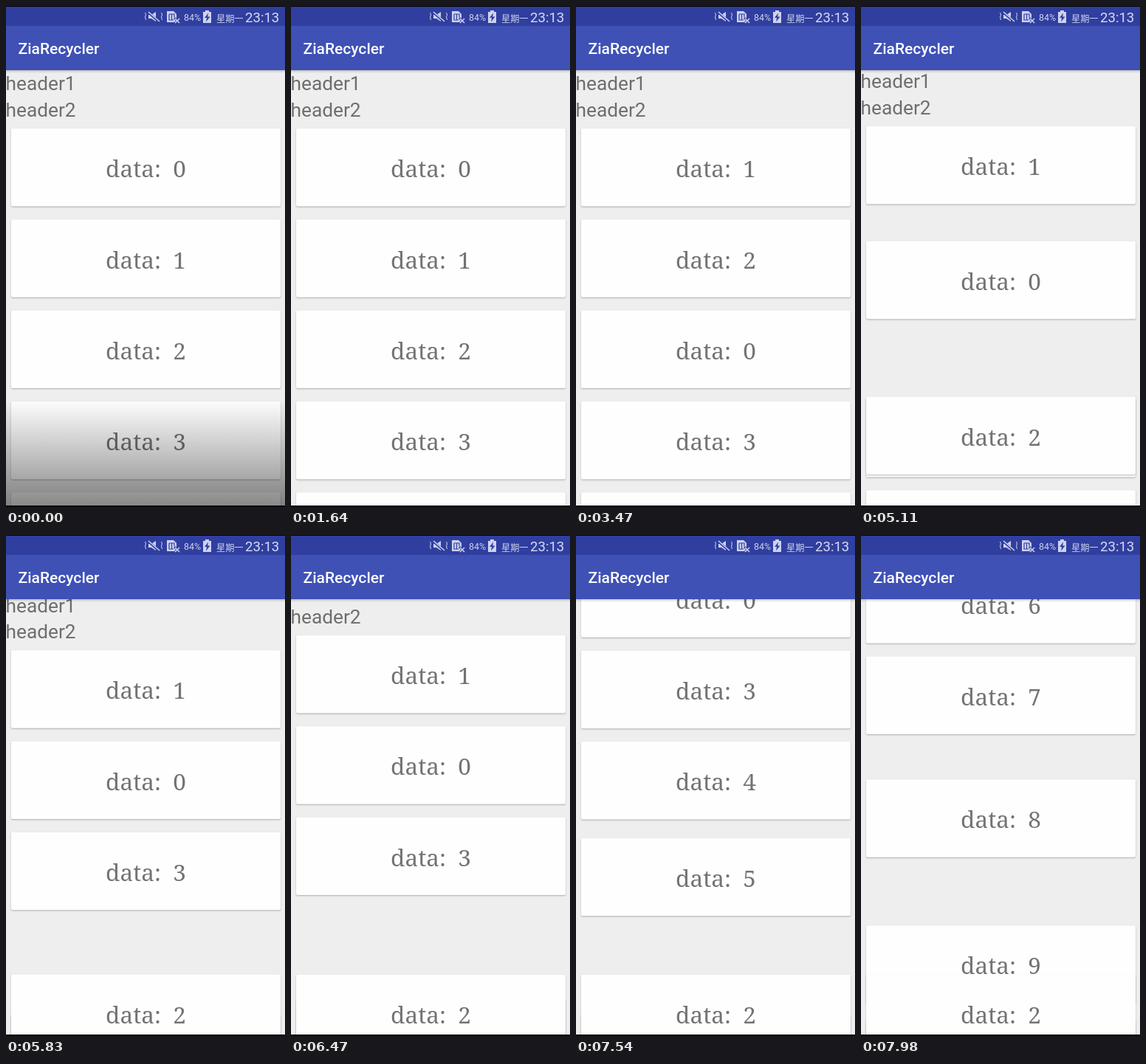
An HTML page with a canvas that plays this animation: 378x679 px, repeating every 8 s.

```html
<!DOCTYPE html>
<html lang="en">
<head>
<meta charset="utf-8">
<title>Drag and drop list</title>
<style>
html, body { margin: 0; width: 100%; height: 100%; overflow: hidden; background: #000; }
canvas { display: block; width: 100vw; height: 100vh; }
</style>
</head>
<body>
<canvas id="stage" width="378" height="679"></canvas>
<script>
const ctx = document.getElementById('stage').getContext('2d');
const W = 378, BOTTOM = 677, LOOP = 8000;
const BAR_TOP = 27, BAR_END = 87;
const LIST_TOP = 166, PITCH = 123.3, CARD_H = 105.5;
const NUDGE = 3, MOVE_MS = 250, EDGE_START = 5600;
const BAR = '#303f9f', ICON = '#cdd2ee';

const clamp = x => Math.max(0, Math.min(1, x));
const ease = x => 0.5 - Math.cos(Math.PI * clamp(x)) / 2;
const easeInverse = p => Math.acos(1 - 2 * p) / Math.PI;
const slotY = slot => LIST_TOP + slot * PITCH;

// The two finger drags, in card tops
const first = { from: slotY(0), to: 475, start: 1660, time: 860 };
const second = { from: slotY(1) - NUDGE, to: 562, start: 4700, time: 529 };
const dragY = (d, t) => d.from + (d.to - d.from) * ease((t - d.start) / d.time);
const passTime = (d, y) => d.start + d.time * easeInverse((y - d.from) / (d.to - d.from));

const DROP = first.start + first.time + 10;

// A card gives way when the dragged one passes it
const swaps = [
  passTime(second, slotY(2) - NUDGE),
  passTime(first, slotY(1)),
  passTime(first, slotY(2)),
  passTime(second, slotY(3) - NUDGE)
];
// Later cards give way ever faster as the edge scroll speeds up
const swapTime = item => swaps[item] ?? EDGE_START + 1428 * (item - 3) ** 0.2775;

function scrollAt(t) {
  const u = Math.max(0, (t - EDGE_START) / 1000);
  return NUDGE * ease((t - 3470) / 770) + 29.2 * u + 3.67 * u ** 6;
}

function cardTop(item, t, scroll) {
  if (item === 0 && t < DROP + MOVE_MS) {
    const y = dragY(first, t);
    return y + (slotY(2) - y) * ease((t - DROP) / MOVE_MS);
  }
  if (item === 2 && t >= second.start) {
    return dragY(second, t) + 34 * ease((t - EDGE_START) / MOVE_MS);
  }
  const home = item || 2;
  return slotY(home - ease((t - swapTime(item)) / MOVE_MS)) - scroll;
}

function text(str, x, y, font, color, align = 'left') {
  ctx.font = font;
  ctx.fillStyle = color;
  ctx.textAlign = align;
  ctx.fillText(str, x, y);
}

function rect(x, y, w, h, fill) {
  ctx.fillStyle = fill;
  ctx.fillRect(x, y, w, h);
}

function fade(y0, y1, a0, a1) {
  const g = ctx.createLinearGradient(0, y0, 0, y1);
  g.addColorStop(0, `rgba(0,0,0,${a0})`);
  g.addColorStop(1, `rgba(0,0,0,${a1})`);
  rect(0, y0, W, y1 - y0, g);
}

function shape(path, color) {
  ctx.fillStyle = color;
  ctx.fill(new Path2D(path));
}

function line(path, color, width) {
  ctx.strokeStyle = color;
  ctx.lineWidth = width;
  ctx.stroke(new Path2D(path));
}

function card(item, y) {
  if (y > BOTTOM || y + CARD_H < BAR_END - 4) return;
  ctx.save();
  ctx.shadowColor = 'rgba(0,0,0,0.28)';
  ctx.shadowBlur = 2;
  ctx.shadowOffsetY = 1;
  ctx.beginPath();
  ctx.roundRect(7, y, 365, CARD_H, 2);
  ctx.fillStyle = '#fefefe';
  ctx.fill();
  ctx.restore();
  text('data:  ' + item, 189.5, y + 66.2, '31.5px "Noto Serif", serif', '#737373', 'center');
}

function list(t) {
  const scroll = scrollAt(t);
  const held = t < second.start ? 0 : 2;
  rect(0, BAR_END, W, BOTTOM - BAR_END, '#eeeeee');
  for (const n of [1, 2]) {
    text('header' + n, -0.5, 78.8 + 35.6 * n - scroll, '26.25px Roboto, sans-serif', '#6e6e6e');
  }
  for (let i = 0; i < 13; i++) {
    if (i !== held) card(i, cardTop(i, t, scroll));
  }
  card(held, cardTop(held, t, scroll));
}

function statusIcons() {
  // Muted speaker
  shape('M193 12h4l6-4v13l-6-4h-4z', ICON);
  line('M192 8l15 13', BAR, 3);
  line('M193 8l15 13', ICON, 1.5);
  line('M188.5 9l1 3-1 3 1 4M210.5 9l1 3-1 3 1 4', ICON, 1);

  // Card with a cross
  shape('M218 7h9l4 4v11h-13z', ICON);
  line('M221 11h7v4M221 11v8h6M224.5 11v8', BAR, 1.2);
  line('M228 16l8 8m0-8l-8 8', BAR, 3);
  line('M229 17l6 6m0-6l-6 6', ICON, 1.5);

  // Charging battery
  shape('M270 6h5v2h3v15h-11v-15h3z', ICON);
  shape('M274 9.5l-5 6.5h3l-1 5.5 5.5-7h-3.3z', BAR);
}

function bars() {
  fade(BAR_END, BAR_END + 4, 0.18, 0);
  rect(0, 0, W, BAR_TOP, BAR);
  rect(0, 0, W, 1, '#000');
  rect(0, BAR_TOP, W, BAR_END - BAR_TOP, '#3f51b5');
  text('ZiaRecycler', 16.5, 65, '500 21px Roboto, sans-serif', '#ffffff');
  statusIcons();
  text('84%', 241, 20, '12.4px Roboto, sans-serif', ICON);
  text('星期一', 285, 21.5, '12.2px "Noto Sans CJK SC", "Noto Sans CJK", sans-serif', ICON);
  text('23:13', 324, 22, '18.6px Roboto, sans-serif', '#d6daf1');
}

function draw(t) {
  list(t);
  const glow = 1 - clamp((t - 30) / 480);
  if (glow > 0) fade(534, BOTTOM, 0, 0.46 * glow);
  bars();
  rect(0, BOTTOM, W, 2, '#000');
}

const start = performance.now();
function tick() {
  draw((performance.now() - start) % LOOP);
  requestAnimationFrame(tick);
}
tick();
</script>
</body>
</html>
```
